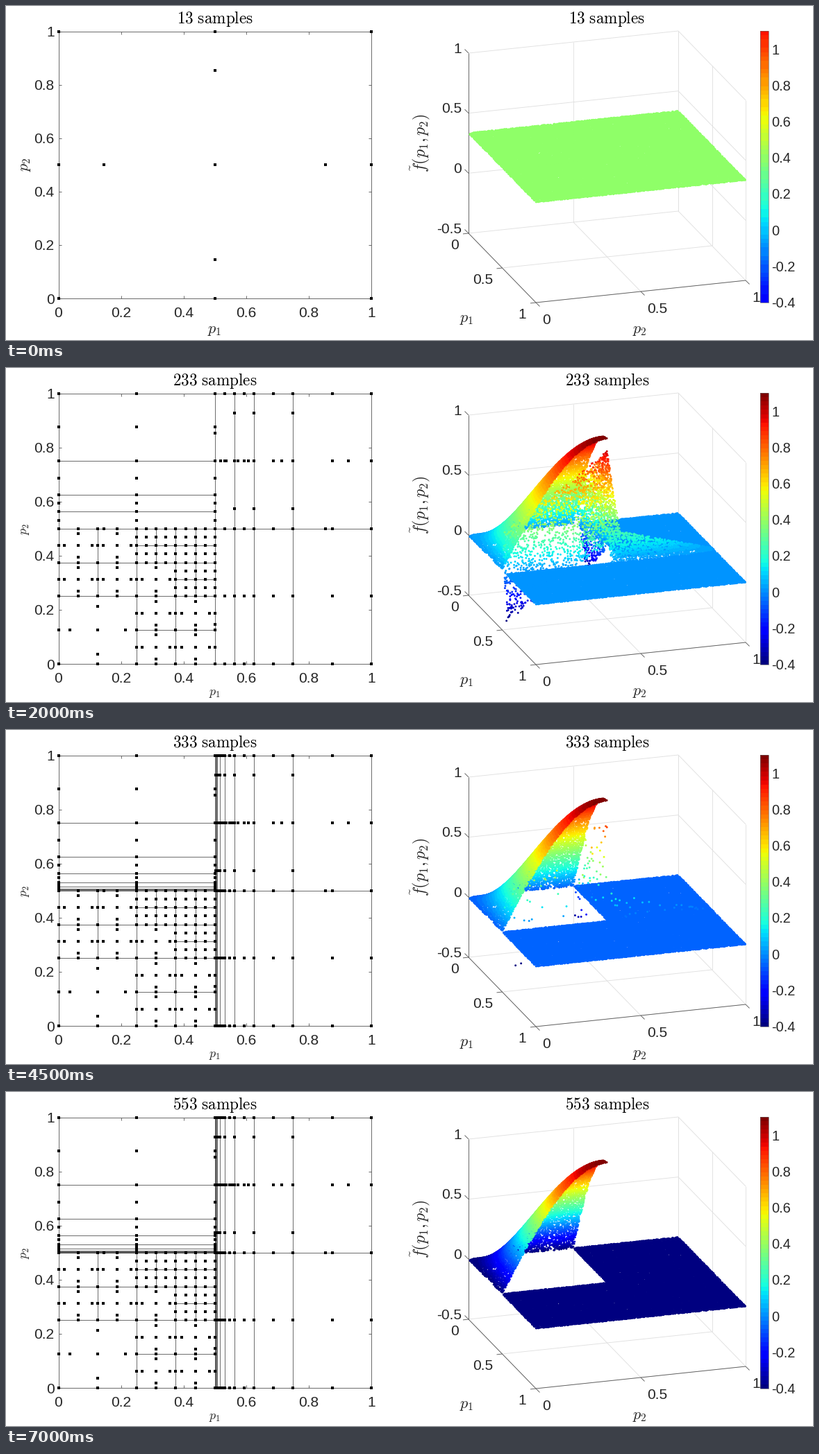
Recreate the animation shown at these times as a matplotlib script. Size 1162 by 482 pixels, loop 7500 ms.

```python
from itertools import product

import matplotlib.pyplot as plt
import numpy as np
from matplotlib.animation import FuncAnimation

W, H, DPI = 1162, 482, 64
PX = 72 / DPI  # points per pixel
plt.rcParams.update({"font.family": "Liberation Sans", "mathtext.fontset": "cm"})

LEVELS = [1, 1, 2, 3, 4, 5, 6, 7, 8, 9, 10, 12, 14, 17, 20]
LOBATTO = (1 - np.sqrt(0.5)) / 2
P1, P2 = np.random.default_rng(4).random((2, 42000))
JET = plt.get_cmap("jet", 64)

fig = plt.figure(figsize=(W / DPI, H / DPI), dpi=DPI, facecolor="white")
ax = fig.add_axes([0, 0, 1, 1])


# ---- adaptive sampling -------------------------------------------------
def lattice(x, y, w, h, n):
    return {(x + w * i / n, y + h * j / n) for i, j in product(range(n + 1), repeat=2)}


def lobatto(x, y, w, h):
    a, b = LOBATTO, 1 - LOBATTO
    return {(x + w * u, y + h * v) for u, v in ((a, .5), (b, .5), (.5, a), (.5, b))}


def samples(step):
    pts = lattice(0, 0, 1, 1, 2) | lobatto(0, 0, 1, 1)
    if step >= 1:
        pts |= lattice(0, 0, 1, 1, 4)
    if step >= 2:
        pts |= lattice(0, 0, .5, .5, 4)
    for level in range(2, LEVELS[step] + 1):
        w = .5 ** level
        for d in (w / 2, 1.5 * w):
            pts |= {(.5 + d, j / 4) for j in range(5)}
            pts |= {(i / 4, .5 + d) for i in range(3)}
        pts |= lobatto(.5, .5, 2 * w, .5)
    if step >= 3:
        pts |= lobatto(0, 0, .25, .25)
        for x, y in ((0, .25), (.25, 0), (.25, .25)):
            pts |= lattice(x, y, .25, .25, 4)
    if step >= 4:
        for i, j in product(range(4), repeat=2):
            if max(i, j) < 2:
                continue
            cell = (i / 8, j / 8, 1 / 8, 1 / 8)
            fine = min(i, j) >= 2 and (i, j) != (2, 2)
            pts |= lattice(*cell, 4) if fine else lobatto(*cell)
    return sorted({(round(x, 9), round(y, 9)) for x, y in pts})


def cell_lines(step):
    """Cell borders as (vertical?, position, start, end)."""
    out = []
    if step >= 1:
        out += [(v, .5, 0, 1) for v in (True, False)]
    if step >= 2:
        out += [(v, .25, 0, .5) for v in (True, False)]
    for level in range(2, LEVELS[step] + 1):
        out += [(True, .5 + .5 ** level, 0, 1), (False, .5 + .5 ** level, 0, .5)]
    if step >= 3:
        out += [(True, .125, .25, .5), (False, .125, .25, .5)]
        out += [(v, .375, 0, .5) for v in (True, False)]
    if step >= 4:
        out += [(False, .4375, .25, .5), (False, .3125, .375, .5),
                (True, .4375, .25, .5), (True, .3125, .375, .5)]
    return out


# ---- surrogate surface -------------------------------------------------
def f(x, y):
    return np.where((x <= .5) & (y <= .5), np.sin(np.pi * x) * np.sin(np.pi * y), 0)


def plane_fit(z, x0, y0, w, h):
    """Least-squares plane through a 3 by 3 stencil of the cell."""
    u, v = np.meshgrid([-1, 0, 1], [-1, 0, 1])
    g = f(x0 + w * (u + 1) / 2, y0 + h * (v + 1) / 2)
    m = (P1 >= x0) & (P1 < x0 + w) & (P2 >= y0) & (P2 < y0 + h)
    s, t = 2 * (P1[m] - x0) / w - 1, 2 * (P2[m] - y0) / h - 1
    z[m] = g.mean() + s * (g * u).sum() / 6 + t * (g * v).sum() / 6


def surface(step):
    if step == 0:
        return np.full(P1.size, .335)
    z = f(P1, P2)
    if step == 1:
        for x, y in product((0, .5), repeat=2):
            plane_fit(z, x, y, .5, .5)
    elif step == 2:
        for x, y in product((0, .25), repeat=2):
            plane_fit(z, x, y, .25, .25)
        plane_fit(z, .5, 0, .25, .5)
        plane_fit(z, .5, .5, .25, .5)
        plane_fit(z, 0, .5, .5, .25)
    else:
        w = .5 ** LEVELS[step]
        for a, b in ((P1, P2), (P2, P1)):
            s, t = (a - .5) / w, 2 * b
            strip = (s > 0) & (s < 1) & (t < 1)
            z[strip] = (.3 - .7 * s + .6 * t)[strip]
        s, t = (P1 - .5) / w, 2 * P2 - 1
        strip = (s > 0) & (s < 1) & (t > 0)
        z[strip] = (.25 * (1 - s) * (1 - t))[strip]
    return z


# ---- drawing helpers ---------------------------------------------------
def line(a, b, color="#5c5c5c", width=.9, z=2):
    ax.plot([a[0], b[0]], [a[1], b[1]], color=color, lw=width * PX, zorder=z,
            solid_capstyle="butt")


def label(x, y, s, ha="center", size=21):
    ax.text(x, y + .36 * size, s, ha=ha, va="baseline", size=size * PX,
            color="#262626", zorder=6)


def symbol(x, y, s, size, rotation=0):
    ax.text(x, y, s, ha="center", va="center", size=size * PX, rotation=rotation,
            color="#262626", zorder=6)


def title(x, n):
    ax.text(x, 25, rf"$\mathrm{{{n}\ samples}}$", ha="center", va="baseline",
            size=23.2 * PX, color="black", zorder=6)


def draw_grid(step):
    left, right, top, bottom = 75.5, 526, 36.5, 422 if step == 0 else 427

    def at(x, y):
        return left + (right - left) * x, bottom + (top - bottom) * y

    for vertical, c, a, b in cell_lines(step):
        line(*((at(c, a), at(c, b)) if vertical else (at(a, c), at(b, c))),
             color="#4a4a4a", width=.8)
    for a, b in (((0, 0), (1, 0)), ((1, 0), (1, 1)), ((1, 1), (0, 1)), ((0, 1), (0, 0))):
        line(at(*a), at(*b))
    for i in range(6):
        v = i / 5
        x, y = at(v, v)
        line((x, bottom), (x, bottom - 4.5))
        line((x, top), (x, top + 4.5))
        line((left, y), (left + 4.5, y))
        line((right, y), (right - 4.5, y))
        label(x, bottom + 19.5, f"{v:g}")
        label(69.5, y, f"{v:g}", "right")

    pts = samples(step)
    xs, ys = zip(*(at(*p) for p in pts))
    ax.plot(xs, ys, "s", color="black", ms=4.2 * PX, mew=0, zorder=4)
    size = 22 if step == 0 else 18
    symbol(300, 468 if step == 0 else 470, "$p_1$", size)
    symbol(27, 229 if step == 0 else 232, "$p_2$", size, 90)
    title(301, len(pts))
    title(865.5, len(pts))


def draw_surface(step):
    z = surface(step)
    ztop = max(1, z.max())

    def project(x, y, v):
        return (666 + 97 * x + 302 * y,
                328 + 100 * x - 32 * y - 260 * (v + .5) / (ztop + .5))

    def wire(a, b, **style):
        line(project(*a), project(*b), **style)

    pale = dict(color="#e0e0e0", z=1)
    for v in (0, .5, 1):
        wire((0, v, -.5), (0, v, ztop), **pale)
        wire((v, 1, -.5), (v, 1, ztop), **pale)
        wire((v, 0, -.5), (v, 1, -.5), **pale)
        wire((0, v, -.5), (1, v, -.5), **pale)
    for v in (0, .5, ztop):
        wire((0, 0, v), (0, 1, v), **pale)
        wire((0, 1, v), (1, 1, v), **pale)
    wire((0, 0, -.5), (0, 0, ztop))
    wire((0, 0, -.5), (1, 0, -.5))
    wire((1, 0, -.5), (1, 1, -.5))

    for v in (-.5, 0, .5, 1):
        x, y = project(0, 0, v)
        line((x, y), (x - 5.5, y - 5.5))
        label(656, y - 8, f"{v:g}", "right")
    for v in (0, .5, 1):
        x, y = project(v, 0, -.5)
        line((x, y), (x - 8, y + .9))
        label(x - (28 if v == .5 else 20), y + 15, f"{v:g}")
        x, y = project(1, v, -.5)
        line((x, y), (x + 5.5, y + 5.5))
        label(x + (24 if v == .5 else 15), y + 23.5, f"{v:g}")
    symbol(663, 452, "$p_1$", 22)
    symbol(912, 468, "$p_2$", 22)
    symbol(597, 198, r"$\tilde{f}(p_1,p_2)$", 24, 90)

    # paint from back to front as seen by the camera
    depth = .927 * (.952 * P1 - .306 * P2) + .375 * (z + .5) / 1.5
    order = np.argsort(depth)
    span = np.ptp(z)
    shade = (z - z.min()) / span if span else np.full(z.size, .53)
    x, y = project(P1[order], P2[order], z[order])
    ax.scatter(x, y, s=(2.9 * PX) ** 2, c=JET(shade[order]), linewidths=0, zorder=3)


def draw_colorbar(step):
    low, high = (.12, .88) if step == 0 else (0, 1)
    ramp = JET(np.linspace(low, high, 64))[::-1, None, :3]
    ax.imshow(ramp, extent=(1086, 1098, 428, 36), aspect="auto",
              interpolation="nearest", zorder=4)
    for a, b in (((1086, 36), (1098, 36)), ((1098, 36), (1098, 428)),
                 ((1098, 428), (1086, 428)), ((1086, 428), (1086, 36))):
        line(a, b, width=.6, z=5)
    for i in range(-2, 6):
        label(1102.5, 323.5 - 52.2 * i, f"{i / 5:g}", "left", 20)


def update(step):
    ax.clear()
    draw_grid(step)
    draw_surface(step)
    draw_colorbar(step)
    ax.set(xlim=(0, W), ylim=(H, 0))
    ax.axis("off")
    return []


anim = FuncAnimation(fig, update, frames=len(LEVELS), interval=500,
                     init_func=lambda: [], repeat=True, repeat_delay=0)
plt.show()
```
